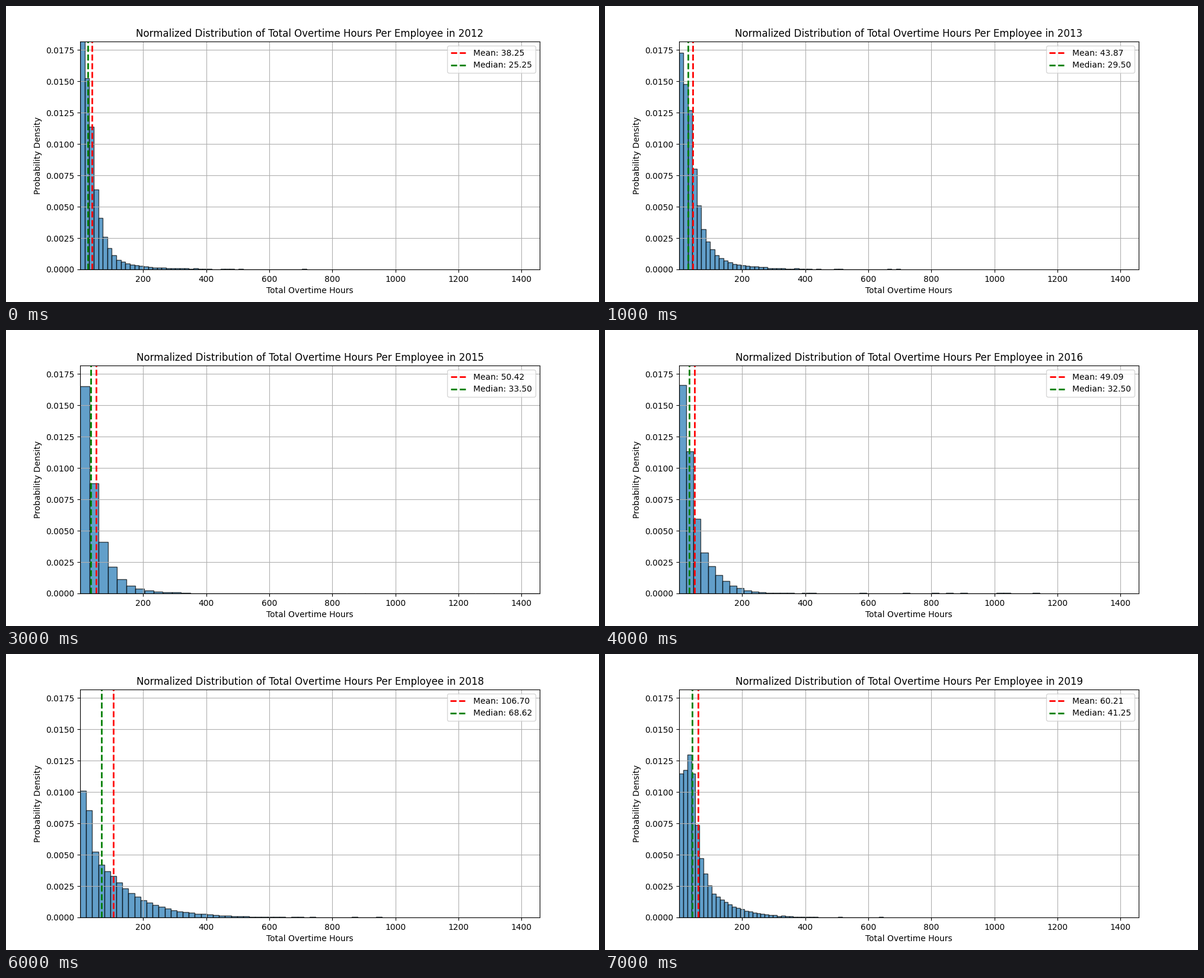
A matplotlib script that plays this animation: 1000 px wide and 500 px high, repeating every 8 s.

```python
import numpy as np
import matplotlib.pyplot as plt
from matplotlib.animation import FuncAnimation

BINS = 50
EMPLOYEES = 1600
MIN_HOURS, MAX_HOURS = 0.5, 1457.4
MAX_DENSITY = 0.018165
FIRST_YEAR = 2012

# Densities (in 1e-4) are given at a few bins and decay geometrically between.
KEY_BINS = [0, 1, 2, 3, 5, 8, 14, BINS - 1]
LAST_BIN_DENSITY = 0.02

# mean, median, longest overtime, densities at the key bins
YEARS = [
    (38.25, 25.25, 718.5, [237, 152.5, 113.5, 63.7, 26, 7.5, 2.2]),
    (43.87, 29.50, 702, [173, 148, 127, 80, 32, 11, 3]),
    (50.25, 34.38, 663.9, [164.6, 146.7, 131.1, 92.5, 34.9, 14.6, 4.5]),
    (50.42, 33.50, MAX_HOURS, [165, 88, 41, 21, 6, 1.3, 0.2]),
    (49.09, 32.50, 1143, [166, 113.2, 59.4, 32.5, 14.6, 4.2, 0.25]),
    (50.96, 38.75, 895, [85.4, 170.8, 129.7, 70.8, 14.6, 9.9, 0.8]),
    (106.70, 68.62, 957.5, [100.9, 85.8, 52.4, 41.5, 33, 19.3, 7]),
    (60.21, 41.25, 646.5, [114.6, 117.5, 129.7, 114.6, 47.6, 19, 7.5]),
]


def histogram(longest, key_densities, seed):
    """Return bin edges and densities made of whole employees."""
    edges = np.linspace(MIN_HOURS, longest, BINS + 1)
    logs = np.log(key_densities + [LAST_BIN_DENSITY])
    expected = np.exp(np.interp(np.arange(BINS), KEY_BINS, logs)) * 1e-4
    one_employee = 1 / (EMPLOYEES * (edges[1] - edges[0]))
    chance = np.random.default_rng(seed).random(BINS)
    counts = np.floor(expected / one_employee + chance)
    counts[-1] = max(counts[-1], 1)
    return edges, counts * one_employee


fig, ax = plt.subplots(figsize=(10, 5), dpi=100)


def mark(name, hours, color):
    ax.axvline(hours, color=color, linestyle="dashed", linewidth=2,
               label=f"{name}: {hours:.2f}")


def draw_year(index):
    year = FIRST_YEAR + index
    mean, median, longest, key_densities = YEARS[index]
    edges, density = histogram(longest, key_densities, seed=year)
    ax.clear()
    ax.hist(edges[:-1], bins=edges, weights=density, alpha=0.7,
            edgecolor="black")
    mark("Mean", mean, "red")
    mark("Median", median, "green")
    ax.set_xlim(MIN_HOURS, MAX_HOURS)
    ax.set_ylim(0, MAX_DENSITY)
    ax.set_title("Normalized Distribution of Total Overtime Hours "
                 f"Per Employee in {year}")
    ax.set_xlabel("Total Overtime Hours")
    ax.set_ylabel("Probability Density")
    ax.legend(loc="upper right")
    ax.grid(True)


animation = FuncAnimation(fig, draw_year, frames=len(YEARS), interval=1000,
                          repeat=True, repeat_delay=0)
plt.show()
```
